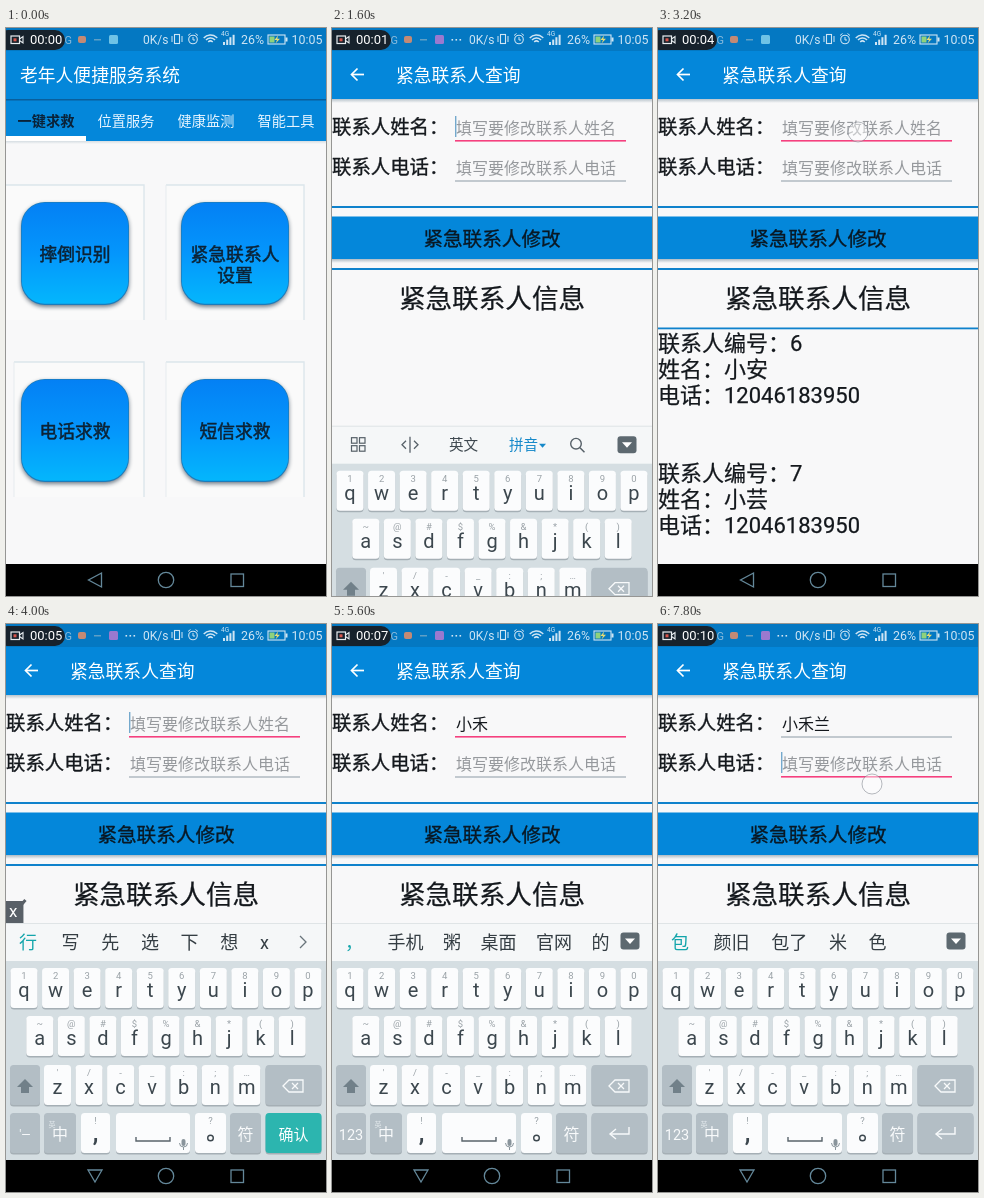
An HTML page with a canvas that plays this animation: 320 by 568 pixels, repeating every 8000 ms.

```html
<!DOCTYPE html>
<html lang="zh-CN">
<head>
<meta charset="utf-8">
<title>便捷服务</title>
<style>
html, body { margin: 0; width: 100%; height: 100%; overflow: hidden; background: #000; }
canvas { display: block; width: 320px; height: 568px; }
</style>
</head>
<body>
<canvas id="stage"></canvas>
<script>
const W = 320, H = 568, LOOP = 8000, STEP = 200, KB_TOP = 299, KB_H = H - KB_TOP;
const BLUE = '#0487da', DARK_BLUE = '#0478c2', RULE = '#0f82cc';
const PAPER = '#f8f8f9', INK = '#14181d', PINK = '#f5407f';
const PHONE = '12046183950';
const FONT = 'Roboto, "Noto Sans CJK SC", "Noto Sans CJK", sans-serif';

const canvas = document.getElementById('stage');
const c = canvas.getContext('2d');
const dpr = window.devicePixelRatio || 1;
canvas.width = W * dpr;
canvas.height = H * dpr;

// Moments at which the recorder's clock gains a second.
const ticks = [800, 1800, 2400, 3200, 4000, 4800, 5400, 6200, 7000, 7600];

// Start time, committed name, pinyin being typed, candidates.
const typing = [
  [0, '', '', ''],
  [4000, '', 'x', '行 写 先 选 下 想 x'],
  [4200, '', 'xi', '系 西 洗 细 喜 息'],
  [4400, '', 'xia', '下 夏 吓 侠 虾 霞'],
  [4600, '', 'xiao', '小 笑 校 效 消 晓'],
  [4800, '小', '', '的 心 时候 姐 朋友'],
  [5000, '小', 'h', '会 好 还 和 很 后 h'],
  [5200, '小', 'he', '和 喝 河 合 何 禾'],
  [5400, '小禾', '', '， 手机 粥 桌面 官网 的'],
  [6200, '小禾', 'l', '了 来 里 老 啦 两 l'],
  [6400, '小禾', 'la', '啦 拉 辣 来 蓝 老'],
  [6600, '小禾', 'lan', '蓝 兰 懒 烂 栏 篮'],
  [6800, '小禾兰', '', '包 颜旧 包了 米 色']
];

// Start, end, x, y of each tap.
const taps = [
  [200, 400, 70, 405], [1000, 1200, 190, 212], [3200, 3400, 200, 104], [7600, 8000, 214, 160]
];

const clamp = v => Math.max(0, Math.min(1, v));
const between = (t, a, b) => t >= a && t < b;

function rect(x, y, w, h, fill) {
  c.fillStyle = fill;
  c.fillRect(x, y, w, h);
}

function round(x, y, w, h, r, fill) {
  c.beginPath();
  c.roundRect(x, y, w, h, r);
  c.fillStyle = fill;
  c.fill();
}

function line(points, color, width = 1, close = false) {
  c.beginPath();
  points.forEach(([x, y], i) => i ? c.lineTo(x, y) : c.moveTo(x, y));
  if (close) c.closePath();
  c.strokeStyle = color;
  c.lineWidth = width;
  c.stroke();
}

function poly(points, fill) {
  c.beginPath();
  points.forEach(([x, y]) => c.lineTo(x, y));
  c.fillStyle = fill;
  c.fill();
}

function ring(x, y, r, color, width = 1, from = 0, to = Math.PI * 2) {
  c.beginPath();
  c.arc(x, y, r, from, to);
  c.strokeStyle = color;
  c.lineWidth = width;
  c.stroke();
}

// y is the visual middle of the text; an outline makes it slightly heavier.
function text(s, x, y, size, color = INK, align = 'left', weight = 400, outline = 0) {
  c.font = `${weight} ${size}px ${FONT}`;
  c.textAlign = align;
  c.fillStyle = color;
  c.fillText(s, x, y + size * 0.37);
  if (!outline) return;
  c.strokeStyle = color;
  c.lineWidth = outline;
  c.lineJoin = 'round';
  c.strokeText(s, x, y + size * 0.37);
  c.lineJoin = 'miter';
}

const heavy = (s, x, y, size, color, align, outline = .35) =>
  text(s, x, y, size, color, align, 400, outline);

function gradient(y0, y1, ...colors) {
  const g = c.createLinearGradient(0, y0, 0, y1);
  colors.forEach((col, i) => g.addColorStop(i / (colors.length - 1), col));
  return g;
}

function shadow(color, blur, dy) {
  c.shadowColor = color;
  c.shadowBlur = blur * dpr;
  c.shadowOffsetY = dy * dpr;
}

function at(x, y, draw) {
  c.save();
  c.translate(x, y);
  draw();
  c.restore();
}

function header(title, x) {
  rect(0, 0, W, H, PAPER);
  rect(0, 71, W, 4, gradient(71, 75, '#b9c4cc', PAPER));
  rect(0, 0, W, 71, BLUE);
  rect(0, 0, W, 23, DARK_BLUE);
  text(title, x, 47, 17.8, '#fff');
}

function backArrow() {
  line([[32, 46.5], [20, 46.5]], '#fff', 1.7);
  line([[25.5, 40.5], [19.5, 46.5], [25.5, 52.5]], '#fff', 1.7);
}

function homeButton(col, row, lines) {
  const x = 15 + col * 160, y = 174 + row * 177;
  const left = col ? 160 : row ? 8 : 0, top = y - 17, right = 138 + col * 160;
  rect(left, top, right - left, 135, '#fafafa');
  line([[left, top], [right, top], [right, top + 135]], '#dce6ec', 1.4);
  if (left) line([[left, top], [left, top + 135]], '#e6ebee', 1);
  c.save();
  shadow('rgba(20,40,60,.6)', 4, 2);
  round(x, y, 108, 103, 24, '#1b7cbc');
  c.restore();
  round(x + .8, y + .8, 106.4, 101, 23, gradient(y, y + 103, '#0480f4', '#0496fc', '#04b7fc'));
  lines.forEach((s, i) => heavy(s, x + 54, y + 52 + i * 21.5, 17.8, '#0c2336', 'center', .5));
}

function homePage() {
  header('老年人便捷服务系统', 14);
  rect(0, 71, W, 42, BLUE);
  rect(0, 71, W, 1.5, '#0a5f9c');
  rect(0, 113, W, 3, gradient(113, 116, '#d5dde2', PAPER));
  ['一键求救', '位置服务', '健康监测', '智能工具'].forEach((s, i) =>
    text(s, 40 + i * 80, 93, 14.2, i ? '#e8f5ff' : '#0a2238', 'center', i ? 400 : 700));
  rect(0, 108, 80, 5, '#fff');
  homeButton(0, 0, ['摔倒识别']);
  homeButton(1, 0, ['紧急联系人', '设置']);
  homeButton(0, 1, ['电话求救']);
  homeButton(1, 1, ['短信求救']);
}

function field(label, y, value, hint, focused, caret) {
  heavy(label, 0, y, 19.4, INK);
  text(value || hint, 124, y + 1, 16, value ? INK : '#96999d');
  if (focused) {
    rect(123, y + 13, 171, 1.6, PINK);
    if (caret) rect(123 + value.length * 16, y - 11, 1.4, 21, '#74a9cd');
  } else {
    rect(123, y + 13.5, 171, 1, '#8d9ba5');
  }
}

function formBody(button, heading) {
  rect(0, 178, W, 2, RULE);
  rect(0, 231, W, 4, gradient(231, 235, '#aebac3', PAPER));
  rect(0, 188.5, W, 42.5, BLUE);
  heavy(button, 160, 211, 19.6, '#091824', 'center');
  rect(0, 240, W, 2, RULE);
  heavy(heading, 160, 270, 26.6, INK, 'center', .25);
}

function hand() {
  c.beginPath();
  c.moveTo(113, 339);
  c.bezierCurveTo(113, 325, 135, 325, 135, 339);
  c.lineTo(135, 384);
  c.bezierCurveTo(137, 368, 160, 368, 162, 381);
  c.bezierCurveTo(166, 370, 188, 372, 190, 386);
  c.bezierCurveTo(196, 382, 216, 383, 219, 398);
  c.bezierCurveTo(225, 430, 214, 446, 204, 464);
  c.lineTo(204, 485);
  c.lineTo(131, 485);
  c.lineTo(131, 465);
  c.bezierCurveTo(114, 457, 98, 450, 88, 434);
  c.quadraticCurveTo(80, 418, 61, 406);
  c.bezierCurveTo(52, 399, 58, 389, 69, 393);
  c.quadraticCurveTo(88, 400, 99, 418);
  c.bezierCurveTo(105, 427, 113, 425, 113, 413);
  c.closePath();
  c.save();
  shadow('rgba(0,30,70,.5)', 4, 2);
  c.fillStyle = gradient(328, 485, '#f6f8f8', '#ebeeef', '#d6dce0');
  c.fill();
  c.restore();
  line([[131, 465], [204, 465]], '#b6c0c8', 1);
}

function phonePage(caret) {
  header('电话求救', 64);
  backArrow();
  field('联系人姓名：', 99, '小安', '', true, false);
  if (caret) rect(123, 88, 1.2, 21, '#5f6c8c');
  field('联系人电话：', 139, PHONE, '', false);
  formBody('紧急联系人查询', '点击按钮进行求救');
  round(9, 295, 296, 232, 54, '#0d558f');
  round(10, 296, 294, 230, 53, gradient(295, 527, '#1a7fc4', '#0a70b8', '#085a98'));
  hand();
}

function contactList(scroll) {
  rect(0, 299.5, W, 1.8, RULE);
  c.save();
  c.beginPath();
  c.rect(0, 302, W, 234);
  c.clip();
  ['小安', '小芸'].forEach((name, i) => {
    const rows = ['联系人编号：' + (6 + i), '姓名：' + name, '电话：' + PHONE];
    rows.forEach((s, j) => heavy(s, 0, 315 + i * 130 + j * 26 - scroll, 22, INK, 'left', .25));
  });
  if (scroll > 0) rect(316, 303 + scroll * .81, 4, 190, '#b2b5b6');
  c.restore();
}

function queryPage(t, name, caret, listShown, scroll) {
  const onPhone = t >= 7600;
  header('紧急联系人查询', 64);
  backArrow();
  field('联系人姓名：', 99, name, '填写要修改联系人姓名', !onPhone, caret);
  field('联系人电话：', 139, '', '填写要修改联系人电话', onPhone, caret);
  formBody('紧急联系人修改', '紧急联系人信息');
  if (listShown) contactList(scroll);
}

function key(x, y, w, label, sup, fill = '#fbfcfd', color = '#3c474e', size = 20) {
  round(x, y + 1.5, w, 40, 3.5, '#a5afb5');
  round(x, y, w, 40, 3.5, fill);
  const mid = x + w / 2;
  if (sup) text(sup, mid, y + 7.5, 9.5, '#9aa2a7', 'center');
  text(label, mid, y + 21.5, size, color, 'center');
}

function keyRow(letters, sups, x, y) {
  [...letters].forEach((s, i) => key(x + i * 31.55, y, 27, s, sups[i]));
}

function collapseIcon(x, y) {
  round(x - 9.5, y - 8.5, 19, 17, 3, '#5d6970');
  poly([[x - 5, y - 2.5], [x + 5, y - 2.5], [x, y + 3]], '#fff');
}

function toolbar(y) {
  const ink = '#566068';
  for (const [dx, dy] of [[0, 0], [8, 0], [0, 8], [8, 8]]) {
    c.strokeStyle = ink;
    c.lineWidth = 1.2;
    c.strokeRect(19.5 + dx, y - 7 + dy, 5.5, 5.5);
  }
  line([[78, y - 8], [78, y + 8]], ink, 1.3);
  line([[74, y - 4], [70, y], [74, y + 4]], ink, 1.3);
  line([[82, y - 4], [86, y], [82, y + 4]], ink, 1.3);
  text('英文', 117, y, 14.6, '#3e484f');
  text('拼音', 177, y, 14.6, '#1689c9');
  poly([[207, y - 1], [214, y - 1], [210.5, y + 3]], '#1689c9');
  ring(244, y - 1, 5.3, ink, 1.4);
  line([[248, y + 3], [252.5, y + 7.5]], ink, 1.5);
  collapseIcon(295, y);
}

function candidates(list, composing, y) {
  const words = list.split(' ');
  c.font = `400 18px ${FONT}`;
  const widths = words.map(s => c.measureText(s).width);
  const used = widths.slice(1).reduce((a, b) => a + b, 0);
  const gap = Math.min(21.7, (222 - used) / (words.length - 2));
  let x = 55.5;
  words.forEach((s, i) => {
    text(s, i ? x : 13, y, 18, i ? '#343d43' : '#12a5ab');
    if (i) x += widths[i] + gap;
  });
  if (composing) line([[294, y - 6], [300, y], [294, y + 6]], '#69747b', 1.3);
  else collapseIcon(298, y - 1);
}

function pinyinTag(pinyin) {
  c.font = `400 17px ${FONT}`;
  const w = c.measureText(pinyin).width + 9;
  rect(0, 277, w, 22, '#596067');
  text(pinyin, 3, 287, 17, '#fff');
  line([[w - 4, 283], [w + 2, 276]], '#596067', 3);
}

function keyboard(pinyin, list) {
  const dark = '#b3bec5', ink = '#f8fafb';
  if (pinyin) pinyinTag(pinyin);
  rect(0, KB_TOP, W, 39, '#f5f7f8');
  rect(0, KB_TOP, W, 1, '#dfe4e6');
  rect(0, 337, W, 199, '#d5dee2');
  if (list) candidates(list, pinyin, 318);
  else toolbar(318);

  keyRow('qwertyuiop', '1234567890', 4.5, 344);
  keyRow('asdfghjkl', '~@#$%&*()', 20.3, 392);
  keyRow('zxcvbnm', "'/-_:;…", 38, 441);

  key(4, 441, 30, '', '', dark);
  poly([[19, 455], [27, 463], [23, 463], [23, 469], [15, 469], [15, 463], [11, 463]], '#718089');
  key(259.5, 441, 56, '', '', dark);
  line([[277, 462], [283, 456], [297, 456], [297, 468], [283, 468]], ink, 1.3, true);
  line([[286, 459], [292, 465]], ink, 1.3);
  line([[292, 459], [286, 465]], ink, 1.3);

  key(4, 489, 30, pinyin ? "′—" : '123', '', dark, ink, pinyin ? 12 : 14.5);
  key(38, 489, 32, '中', '', dark, ink, 16);
  text('英', 46, 500, 7, '#e4eaed', 'center');
  key(75, 489, 29, '', '!');
  text(',', 89.5, 508, 23, '#3c474e', 'center', 700);
  key(110, 489, 74, '', '');
  line([[130, 513], [130, 517], [164, 517], [164, 513]], '#59646b', 1.4);
  round(175.5, 515, 4, 7, 2, '#89949b');
  ring(177.5, 519, 4, '#89949b', 1, 0, Math.PI);
  line([[177.5, 523], [177.5, 526]], '#89949b', 1);
  key(189, 489, 31, '', '?');
  ring(204.5, 514, 2.8, '#3c474e', 1.4);
  key(224, 489, 31, '符', '', dark, ink, 16);
  if (pinyin) {
    key(259.5, 489, 56, '确认', '', '#2cb5af', '#fff', 15);
  } else {
    key(259.5, 489, 56, '', '', dark);
    line([[297, 503], [297, 510], [279, 510]], ink, 1.4);
    line([[284, 505], [278, 510], [284, 515]], ink, 1.4);
  }
  navBar(true);
}

function navBar(down) {
  const color = '#64889a';
  rect(0, 536, W, 32, '#000');
  const back = down ? [[82, 546], [96, 546], [89, 558]] : [[95.5, 545], [95.5, 559], [82.5, 552]];
  line(back, color, 1.3, true);
  ring(160, 552, 7.7, color, 1.3);
  c.strokeRect(225, 546, 12.5, 12.5);
}

function statusBar(seconds, kbUp) {
  const ink = '#cfe5f4';
  round(-8, 2, 67, 20, 10, '#17222c');
  c.strokeStyle = '#e8edf0';
  c.lineWidth = 1.2;
  c.strokeRect(5, 8, 8.5, 7.5);
  line([[13.5, 11], [17, 8.5], [17, 15], [13.5, 12.5]], '#e8edf0', 1.1);
  rect(7.5, 10.3, 3, 3, '#d9564c');
  text('00:' + String(seconds).padStart(2, '0'), 24, 11.5, 13, '#fff');
  text('G', 58.5, 11.5, 11, '#8abbdc');
  round(72, 8, 8, 7, 2, '#c38a75');
  rect(88, 11, 7, 1.5, '#5f9fc6');
  round(103, 7, 9, 9, 1.5, kbUp ? '#9b79cf' : '#6fc3e6');
  if (kbUp) [0, 4, 8].forEach(dx => rect(119.5 + dx, 11, 1.6, 1.6, ink));
  text('0K/s', 137, 11.5, 12, ink);

  c.strokeStyle = ink;
  c.lineWidth = 1.1;
  c.strokeRect(168.5, 6.5, 5, 9);
  line([[166, 8], [166, 14]], ink);
  line([[176, 8], [176, 14]], ink);
  ring(187, 11.5, 4.3, ink, 1.1);
  line([[187, 9], [187, 12], [189, 12]], ink);
  line([[182, 7.5], [184.5, 5.5]], ink);
  line([[192, 7.5], [189.5, 5.5]], ink);
  [3, 6, 9].forEach(r => ring(204.5, 16, r, ink, 1.5, -Math.PI * .77, -Math.PI * .23));
  text('4G', 215, 6, 6.5, ink);
  [0, 1, 2, 3].forEach(i => rect(217 + i * 3.2, 14 - i * 2.4, 2, 3 + i * 2.4, ink));
  text('26%', 235, 11.5, 12.4, ink);
  c.strokeStyle = ink;
  c.lineWidth = 1.1;
  c.strokeRect(262, 7, 17, 9);
  rect(279.5, 9.5, 2, 4, ink);
  rect(263.5, 8.5, 5, 6, '#8fd27c');
  poly([[272, 7.5], [268.5, 12], [271, 12], [269.5, 15.5], [274, 10.8], [271.3, 10.8]], '#e9dc72');
  text('10:05', 285.5, 11.5, 12.4, ink);
}

function tapMark(x, y) {
  c.beginPath();
  c.arc(x, y, 10, 0, Math.PI * 2);
  c.fillStyle = 'rgba(255,255,255,.45)';
  c.fill();
  ring(x, y, 10, 'rgba(125,130,138,.55)', 1);
}

// Left edge of an entering page.
const slide = (t, start) => W * (1 - clamp((t - start) / 400)) ** 3;

function slideOver(under, over, x) {
  const p = 1 - x / W;
  at(-110 * p, 0, under);
  rect(0, 0, W, H, `rgba(10,30,45,${.3 * p})`);
  at(x, 0, over);
}

// Distance of the keyboard below its resting place.
function keyboardDrop(t) {
  const rise = start => KB_H * (1 - clamp((t - start) / 350)) ** 2;
  if (t < 1900) return rise(1462);
  if (t < 3200) return KB_H * clamp((t - 1900) / 300) ** 2;
  return rise(3250);
}

function draw(t) {
  const caret = (t / STEP) % 6 !== 4;
  const [, name, pinyin, list] = typing.filter(s => s[0] <= t).pop();
  const drop = keyboardDrop(t);
  const kbUp = drop < KB_H - 1;
  const scrolling = between(t, 2400, 3200);
  const scroll = scrolling ? 44 * Math.sin(Math.PI * (t - 2200) / 1000) : 0;

  const phone = () => phonePage(caret);
  const query = () => queryPage(t, name, caret, !kbUp && t >= 1600, scroll);

  c.setTransform(dpr, 0, 0, dpr, 0, 0);
  if (t < 400) homePage();
  else if (t < 800) slideOver(homePage, phone, slide(t, 378));
  else if (t < 1200) phone();
  else if (t < 1600) slideOver(phone, query, slide(t, 1180));
  else query();

  navBar(false);
  if (kbUp) at(0, drop, () => keyboard(pinyin, list));
  statusBar(ticks.filter(s => s <= t).length, kbUp);
  taps.filter(([a, b]) => between(t, a, b)).forEach(([, , x, y]) => tapMark(x, y));
  if (scrolling) tapMark(226, 416 - scroll);
}

const origin = performance.now();
function frame() {
  const t = (performance.now() - origin) % LOOP;
  draw(Math.floor(t / STEP) * STEP);
  requestAnimationFrame(frame);
}
frame();
</script>
</body>
</html>
```
